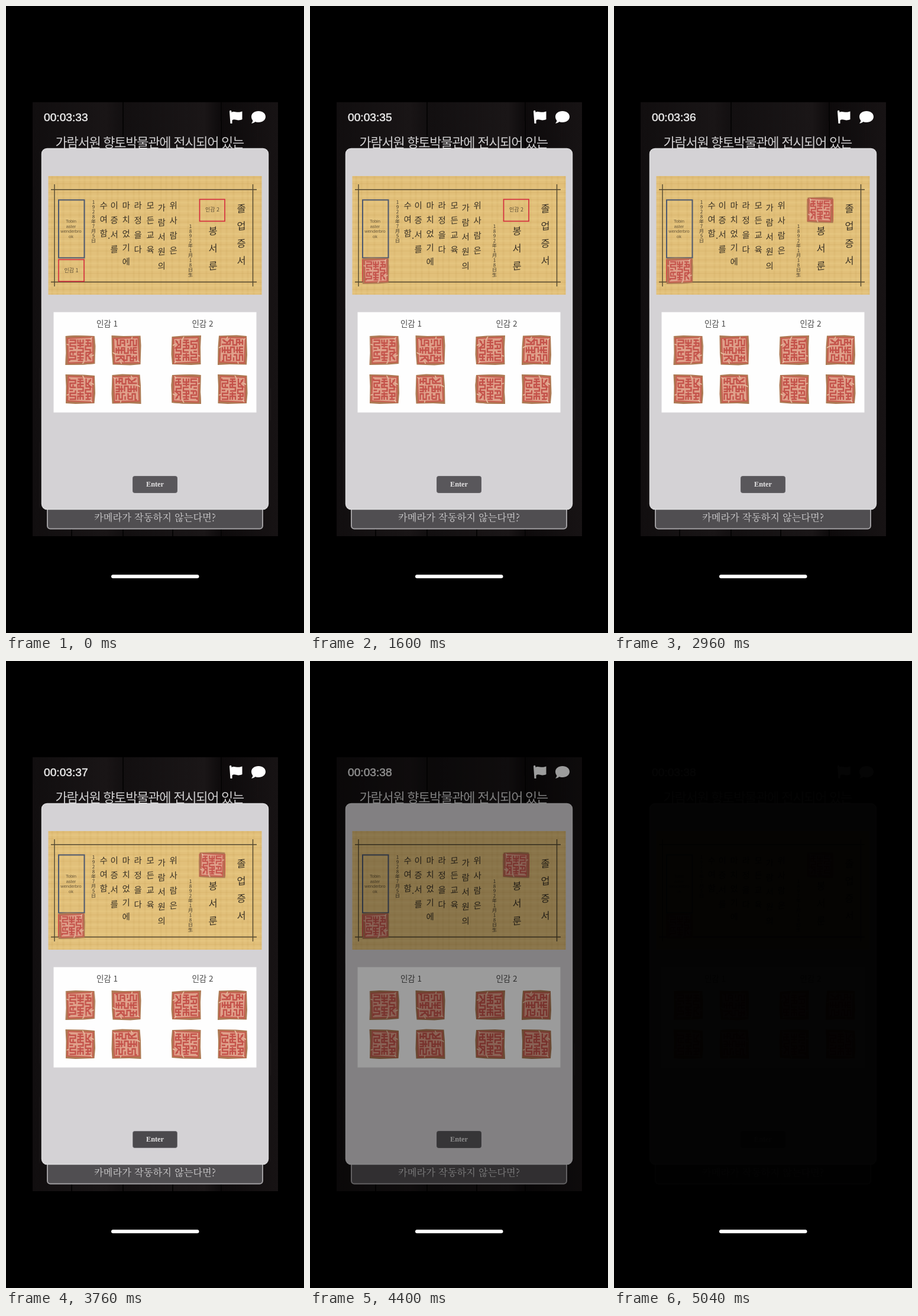
An HTML page for the animation above (5360 ms loop, 504 by 1062 pixels).

```html
<!DOCTYPE html>
<html lang="ko">
<head>
<meta charset="utf-8">
<title>Seal puzzle</title>
<style>
html, body { margin: 0; width: 100%; height: 100%; overflow: hidden; background: #000; }
svg { display: block; width: 504px; height: 1062px; }
text { font-family: "Noto Sans CJK KR", "Noto Sans CJK", "Noto Sans", sans-serif; }
.mid text, text.mid { text-anchor: middle; }
.clock text { font: 19.2px "Liberation Sans", Arial, sans-serif; fill: #ececec; stroke: #ececec; stroke-width: .5; }
.serif { font-family: "Noto Serif CJK KR", "Noto Serif", "Noto Sans CJK KR", serif; font-weight: 500; }
.name text { font: 7.5px "Liberation Sans", Arial, sans-serif; fill: #6b5a3b; }
.brush { font-weight: 500; fill: #3a3226; }

.app, .tick, .dragA, .dragB, .slotA, .slotB, .btn { animation: 5360ms linear infinite; }
.app { animation-name: fade; }
.tick { animation-name: tick; animation-timing-function: step-end; }
.dragA { animation-name: dragA; }
.dragB { animation-name: dragB; }
.slotA { animation-name: slotA; animation-timing-function: step-end; }
.slotB { animation-name: slotB; animation-timing-function: step-end; }
.btn { animation-name: press; animation-timing-function: step-end; }

@keyframes fade {
  0%, 75.1% { opacity: 1; }
  92.8%, 100% { opacity: .02; }
}
@keyframes tick {
  0% { transform: translateY(0); }
  3.73% { transform: translateY(-30px); }
  22.39% { transform: translateY(-60px); }
  41.04% { transform: translateY(-90px); }
  59.7% { transform: translateY(-120px); }
  78.36%, 100% { transform: translateY(-150px); }
}
@keyframes dragA {
  0%, 19.4% { transform: none; animation-timing-function: ease-in-out; }
  28.36%, 29.84% { transform: translate(-13px, -132px); }
  29.85%, 100% { transform: translate(-14.5px, -134.5px) scale(.89); }
}
@keyframes dragB {
  0%, 37.31% { transform: none; animation-timing-function: ease-in-out; }
  46.27% { transform: translate(47px, -250px); animation-timing-function: ease-out; }
  50.75%, 53.72% { transform: translate(44px, -302px); }
  53.73%, 100% { transform: translate(43.7px, -303.5px) scale(.88); }
}
@keyframes slotA {
  0% { opacity: 1; }
  19.4% { opacity: 0; }
  29.85%, 100% { opacity: 1; }
}
@keyframes slotB {
  0% { opacity: 1; }
  37.31% { opacity: 0; }
  53.73%, 100% { opacity: 1; }
}
@keyframes press {
  0% { fill: #59575b; stroke: #656367; }
  67.16% { fill: #4b494d; stroke: #77757a; }
  71.64%, 100% { fill: #59575b; stroke: #656367; }
}
</style>
</head>
<body>
<svg viewBox="0 0 504 1062">
  <defs>
    <linearGradient id="wood">
      <stop stop-color="#110e0f"/><stop offset=".3" stop-color="#191516"/>
      <stop offset=".37" stop-color="#120f10"/><stop offset=".7" stop-color="#1a1617"/>
      <stop offset=".77" stop-color="#0d0a0b"/><stop offset="1" stop-color="#171314"/>
    </linearGradient>
    <pattern id="weave" width="46" height="38" patternUnits="userSpaceOnUse">
      <path d="M5 0V38M17 0V38M32 0V38M41 0V38" stroke="#cba458" stroke-opacity=".16" stroke-width="3"/>
      <path d="M0 6H46M0 18H46M0 29H46" stroke="#f2d890" stroke-opacity=".2" stroke-width="3"/>
      <path d="M0 12H46M0 24H46M0 35H46" stroke="#c2954a" stroke-opacity=".12" stroke-width="2"/>
    </pattern>
    <clipPath id="digit"><rect x="126" y="176" width="18" height="24"/></clipPath>
    <g id="seal">
      <path d="M-24.500-24L-8-25 24-24 25.500-7 24.500 23 6 24.500-25 25-24 5Z" fill="#ad7a54"/>
      <path d="M-23-21L22-23 23 21-21 23Z" fill="#c65f50"/>
      <path d="M-20-19L20-21 20.500 19-19 20.500Z" fill="#e0a18b"/>
      <g fill="none" stroke="#c4524a" stroke-width="2.300">
        <path d="M-18-17H-8V-12H-17V-7H-8V-2M-18-2H-12M-17 3H-7M-17 3V10H-8V15H-18V18M-12 3V8"/>
        <path d="M-4-18V-12H5V-18M0-18V-5M-5-8H6M-4-3H5V3H-4V8H6M0 3V18M-5 13H6M-4 17H5"/>
        <path d="M9-17H18M9-12H18V-7H9V-1H18M13-17V-7M9 4H18L10 11M10 4V18M13 9L18 17M14 14H18M17-2V4"/>
      </g>
      <path d="M-23-10L-19-9M4 23L7 18M20-22L17-18M23 8L19 10" stroke="#e6c1a4" stroke-width="1.500"/>
    </g>
  </defs>

  <g class="app">
    <rect x="45" y="163" width="415" height="735" fill="url(#wood)"/>
    <g id="grain" stroke="#2a2324"></g>
    <path d="M198 163V898M364 163V898M111 853V898M282 853V898" stroke="#050404" stroke-width="2"/>

    <g class="clock">
      <text x="64" y="195">00:03:3</text>
      <g clip-path="url(#digit)"><g class="tick" id="digits"></g></g>
    </g>
    <g fill="#fff">
      <path d="M378 178.500a1.700 1.700 0 0 1 3.400 0V180C386 177 391 182 399.500 178.500V192C391 196 387 190 382.500 193.500V199H379.500Z"/>
      <path d="M427 178c7 0 12 4 12 9.500s-5 9.500-12 9.500c-2 0-4-.4-5.500-1-2 1.700-4 2.700-6.500 2.700 1.500-1.500 2.300-3 2.400-4.700-1.500-1.700-2.400-4-2.400-6.500 0-5.500 5-9.500 12-9.500Z"/>
    </g>
    <text x="83.500" y="239" font-size="22" letter-spacing="-1.250" fill="#cfcecf">가람서원 향토박물관에 전시되어 있는</text>

    <rect x="70" y="800" width="364" height="85.500" rx="5" fill="#504e51" stroke="#a09ea1" stroke-width="2"/>
    <text class="serif mid" x="252" y="872" font-size="16.300" fill="#d3d2d3">카메라가 작동하지 않는다면?</text>
    <rect x="60.500" y="241.500" width="383" height="611" rx="9" fill="#d4d2d5" stroke="#dbdadc" stroke-width="1.500"/>

    <rect x="71.500" y="288" width="361" height="201" fill="#e2c07a"/>
    <rect x="71.500" y="288" width="361" height="201" fill="url(#weave)"/>
    <path d="M76 311H424M76 467.500H424M82 302V475M417.500 302V475" stroke="#51462f" stroke-width="1.400"/>
    <rect x="89" y="328.500" width="43.500" height="98" fill="none" stroke="#4c5870" stroke-width="2"/>
    <g fill="none" stroke="#d5293d" stroke-width="1.600">
      <rect x="89" y="429.500" width="43" height="37"/>
      <rect x="327.500" y="327.500" width="42.500" height="37"/>
    </g>
    <g class="mid" font-size="9" fill="#5c4d34">
      <text x="110.500" y="451">인감 1</text>
      <text x="349" y="348">인감 2</text>
    </g>
    <g class="mid name">
      <text x="110" y="367">Tobin</text><text x="110" y="375.500">aster</text>
      <text x="110" y="384">wenderbro</text><text x="110" y="392.500">ok</text>
    </g>
    <g id="script" class="mid brush"></g>

    <rect x="80.500" y="518.500" width="343" height="170" fill="#fefefe"/>
    <g class="mid" font-size="13.500" fill="#484848">
      <text x="171" y="543">인감 1</text>
      <text x="332.500" y="543">인감 2</text>
    </g>

    <rect class="btn" x="214.500" y="796.500" width="75" height="28" rx="3" fill="#59575b"/>
    <text class="mid" x="252" y="814" fill="#e4e3e4" style="font:bold 12.3px 'Liberation Serif',serif">Enter</text>
    <g id="seals"></g>
  </g>
  <rect x="178" y="963.300" width="148.500" height="5.900" rx="2.900" fill="#fff"/>
</svg>
<script>
const put = (id, html) => document.getElementById(id).innerHTML += html;

// Faint seeded streaks in the planks
let seed = 7;
const rand = () => (seed = seed * 16807 % 2147483647) / 2147483647;
let streaks = '';
for (let i = 0; i < 60; i++) {
  const y = 163 + rand() * 600;
  streaks += `<path d="M${46 + rand() * 412} ${y}v${40 + rand() * 95}" opacity="${rand() * .5}"/>`;
}
put('grain', streaks);

[3, 4, 5, 6, 7, 8].forEach((n, i) =>
  put('digits', `<text x="128.100" y="${195 + i * 30}">${n}</text>`));

// Vertical writing: text, centre x, first centre y, step, size
const columns = [
  ['졸업증서', 398, 343, 29.5, 16.5],
  ['봉서룬', 350, 381, 29.5, 16.5],
  ['위사람은', 283, 338, 25.3, 14.5],
  ['가람서원의', 263, 342, 24.6, 14.5],
  ['모든교육', 244, 338, 25, 14.5],
  ['라정을다', 223, 338, 24.8, 14.5],
  ['마치었기에', 203, 338, 23.8, 14.5],
  ['이증서를', 183, 338, 24.6, 14.5],
  ['수여함', 165, 338, 23.5, 14.5],
  ['.', 174, 389, 0, 15],
  ['1928年7月5日', 148, 332, 8.2, 8],
  ['1892年1月18日生', 312, 373, 8.2, 8]
];
for (const [text, x, y, step, size] of columns)
  [...text].forEach((ch, i) => put('script',
    `<text font-size="${size}" transform="translate(${x} ${y + i * step}) rotate(-6) skewX(-6)" y="${size * .37}">${ch}</text>`));

const seal = (x, y, turn, cls = '') =>
  `<g transform="translate(${x} ${y})"><g class="${cls}"><use href="#seal" transform="${turn}"/></g></g>`;
const A = [125.5, 583, ''], B = [305, 649, 'scale(-1 1)'];
put('seals', [
  seal(...A, 'slotA'),
  seal(203.5, 583, 'rotate(90)'),
  seal(125.5, 649, 'scale(1 -1)'),
  seal(203.5, 649, 'rotate(270)'),
  seal(305, 583, 'rotate(180)'),
  seal(383, 583, 'rotate(90) scale(-1 1)'),
  seal(...B, 'slotB'),
  seal(383, 649, 'rotate(180) scale(-1 1)'),
  seal(...A, 'dragA'),
  seal(...B, 'dragB')
].join(''));
</script>
</body>
</html>
```
